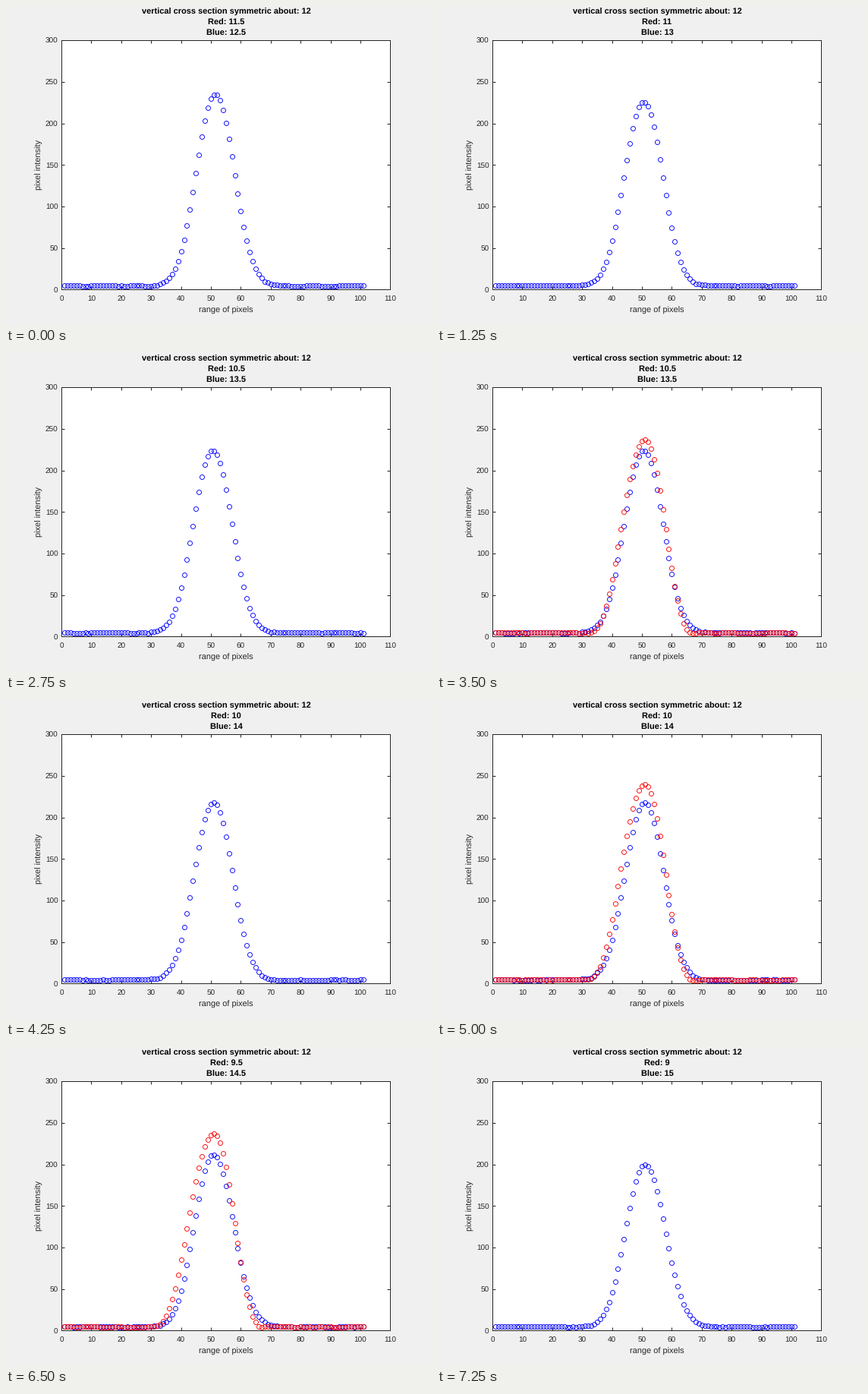
Write a matplotlib script that moves like this. It is 560 px wide and 420 px high and loops after 8 s.

```python
import numpy as np
import matplotlib.pyplot as plt
from matplotlib.animation import FuncAnimation

W, H = 560, 420
STEP = 250            # ms per frame
LOOP = 8000
HALF = 750            # blue alone, then blue with red
LEAD = 250            # the loop starts this far into the first pair
INK = "#262626"

plt.rcParams["font.family"] = "Liberation Sans"
plt.rcParams["text.hinting"] = "none"

# Peak height, peak pixel, and the pixels where each side is at half height
BLUE = [
    (235, 51.4, 44.1, 58.8),
    (226, 50.6, 43.1, 57.9),
    (224, 50.6, 43.1, 58.0),
    (218, 50.9, 43.4, 58.2),
    (212, 50.8, 43.5, 58.5),
    (200, 51.0, 43.6, 58.8),
]
RED_TOPS = [242, 242, 237, 240, 237]

rng = np.random.default_rng(4)
pixels = np.arange(1, 102)


def background():
    """Level 5 with short runs at 4."""
    noise = np.convolve(rng.normal(size=pixels.size), np.ones(5), "same")
    return np.where(noise < -1.5, 4.0, 5.0)


def profile(top, peak, left, right, power):
    """Bell of cos**power with its own half width on each side."""
    d = pixels - peak
    width = np.where(d < 0, peak - left, right - peak)
    angle = np.arccos(0.5 ** (1 / power)) * np.abs(d) / width
    bell = np.cos(np.minimum(angle, np.pi / 2)) ** power
    base = background()
    return base + (top - base) * bell


blues = [profile(*shape, power=14) for shape in BLUE]
reds = [profile(top, 51, 43.3 - 0.35 * k, 58.35, power=2.5)
        for k, top in enumerate(RED_TOPS)]

fig = plt.figure(figsize=(W / 72, H / 72), dpi=72, facecolor="#f0f0f0")
left, right, top, bottom = 73, 506.4, 45.1, 373.4
ax = fig.add_axes([left / W, 1 - bottom / H, (right - left) / W, (bottom - top) / H])
ax.set(xlim=(0, 110), ylim=(0, 300),
       xticks=range(0, 111, 10), yticks=range(0, 301, 50))
ax.tick_params(direction="in", length=4.3, width=1, color=INK, top=True, right=True,
               labelbottom=False, labelleft=False)
for side in ax.spines.values():
    side.set(color=INK, linewidth=1)


def label(x, y, text="", size=11, **kw):
    """Text at pixel (x, y) from the top left, by default centred on its baseline."""
    kw = {"color": INK, "ha": "center", "va": "baseline", **kw}
    return fig.text(x / W, 1 - y / H, text, fontsize=size, **kw)


for v in range(0, 111, 10):
    label(left + v / 110 * (right - left), 388.8, str(v), 10)
for v in range(0, 301, 50):
    label(68.5, bottom - v / 300 * (bottom - top) + 4.2, str(v), 10, ha="right")
label(290, 404, "range of pixels")
label(44, 208.5, "pixel intensity", va="center", rotation=90)

title = dict(color="black", weight="bold")
label(290, 11, "vertical cross section symmetric about: 12", **title)
red_title = label(290, 25, **title)
blue_title = label(290, 39, **title)

ring = dict(marker="o", ls="none", ms=6, mfc="none", mew=0.9)
blue_dots, = ax.plot([], [], mec="#0000ff", **ring)
red_dots, = ax.plot([], [], mec="#ff0000", **ring)


def draw(i):
    pair, part = divmod(i * STEP + LEAD, 2 * HALF)
    offset = 0.5 * (pair + 1)
    red_title.set_text(f"Red: {12 - offset:g}")
    blue_title.set_text(f"Blue: {12 + offset:g}")
    blue_dots.set_data(pixels, blues[pair])
    if part >= HALF:
        red_dots.set_data(pixels, reds[pair])
    else:
        red_dots.set_data([], [])
    return blue_dots, red_dots, red_title, blue_title


anim = FuncAnimation(fig, draw, frames=LOOP // STEP, interval=STEP,
                     repeat=True, repeat_delay=0, blit=False)
plt.show()
```
